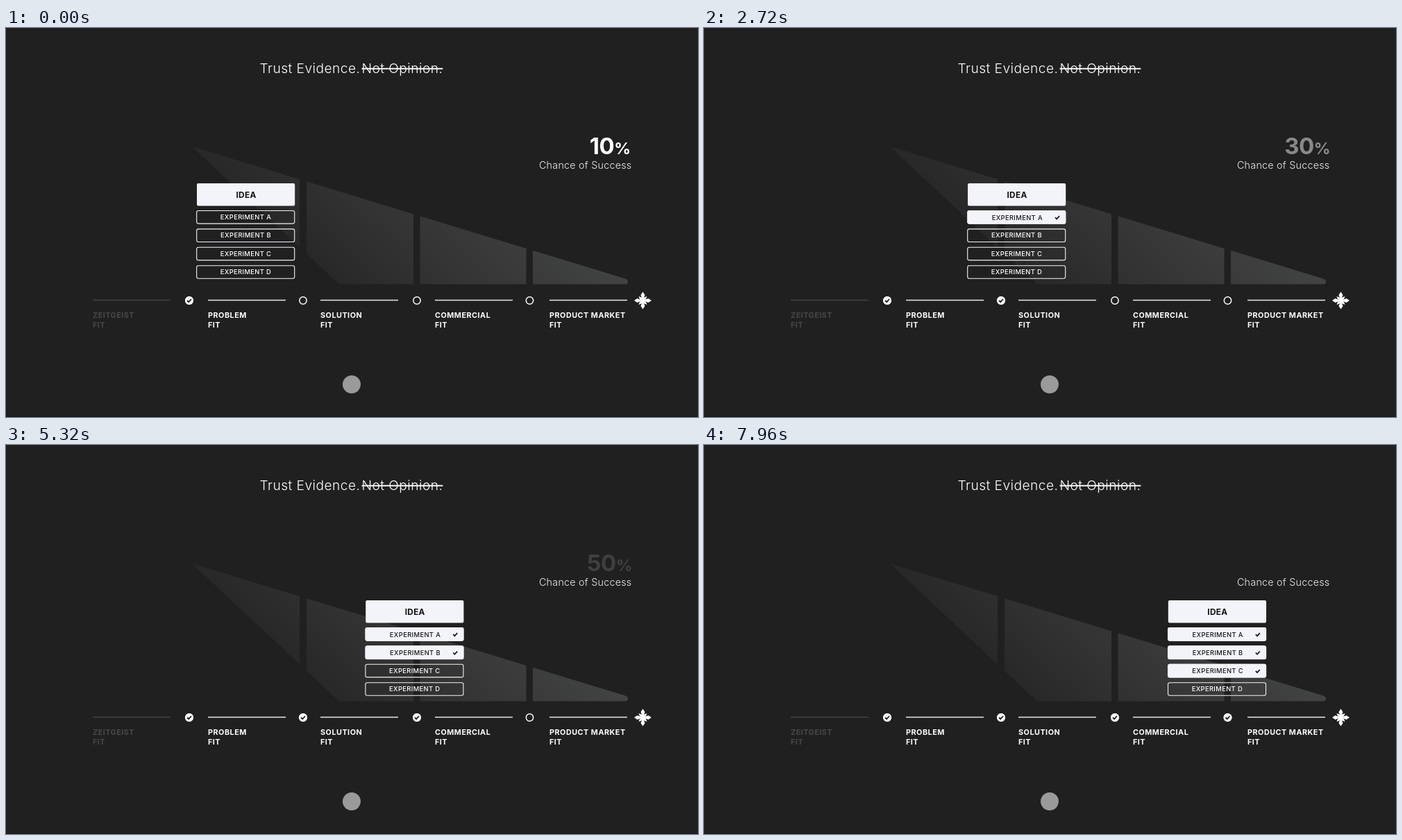
Animation, 997 px wide and 561 px high, one loop 8000 ms. Source, as an HTML page:

```html
<!DOCTYPE html>
<html lang="en">
<head>
<meta charset="utf-8">
<title>Trust Evidence</title>
<style>
  html, body { margin: 0; width: 100%; height: 100%; overflow: hidden; background: #202020; }
  svg { display: block; width: 997px; height: 561px; font-family: Inter, "Open Sans", sans-serif; fill: #fff; }
  .title { font-size: 19.2px; font-weight: 350; letter-spacing: .45px; }
  .strike { text-decoration: line-through; text-decoration-thickness: 1.3px; }
  .chance { font-size: 14.4px; font-weight: 300; letter-spacing: .2px; text-anchor: end; fill: #eee; }
  .percent { font-size: 33px; font-weight: 700; text-anchor: end; letter-spacing: -.6px; }
  .percent tspan { font-size: 23.5px; font-weight: 650; letter-spacing: 0; }
  .label { font-size: 10.8px; font-weight: 700; letter-spacing: .5px; }
  .idea { font-size: 11.8px; font-weight: 700; text-anchor: middle; letter-spacing: .3px; fill: #111; }
  .item { font-size: 9.4px; font-weight: 450; text-anchor: middle; letter-spacing: .35px; }
  .dark { fill: #161616; }
  .tick { fill: none; stroke: #1c1c1c; stroke-width: 1.8; }
</style>
</head>
<body>
<svg viewBox="0 0 997 561">
  <defs>
    <linearGradient id="shade" gradientUnits="userSpaceOnUse" x1="270" y1="173" x2="475" y2="-46">
      <stop offset="0" stop-color="#202020"/>
      <stop offset="0" stop-color="#282828"/>
      <stop offset=".3" stop-color="#313131"/>
      <stop offset="1" stop-color="#434444"/>
    </linearGradient>
  </defs>
  <text class="title" x="365.5" y="65">Trust Evidence.</text>
  <text class="title strike" x="512.5" y="65">Not Opinion.</text>
  <path fill="url(#shade)" d="M268 175Q268 171 273 172.500L892 361.500Q896 363 896 366Q896 369.500 892 369.500H268Z"/>
  <path fill="#202020" d="M423 200h10v172h-10zM587 250h9.500v122h-9.500zM749.500 300h9.500v72h-9.500z"/>
  <g id="percents"></g>
  <text class="chance" x="901.5" y="203">Chance of Success</text>
  <g id="track"></g>
  <g id="star" transform="translate(917.5 393)"></g>
  <circle cx="498" cy="514" r="13" fill="#9a9a9a"/>
  <rect y="560" width="997" height="1" fill="#141414"/>
  <g id="card"></g>
</svg>
<script>
const LOOP = 8000, PERIOD = 2680;
const MOVE = 2167, FILL = 640;
const PULSES = [1560, 4040, 6720];
const NODES = [264, 428, 592, 754.5];
const STOPS = [[125, 'ZEITGEIST'], [291, 'PROBLEM'], [453, 'SOLUTION'], [618, 'COMMERCIAL'], [783, 'PRODUCT MARKET']];

const $ = id => document.getElementById(id);
const all = sel => [...document.querySelectorAll(sel)];
const progress = (t, start, length) => Math.min(1, Math.max(0, (t - start) / length));
const inOut = p => p < .5 ? 2 * p * p : 1 - 2 * (1 - p) ** 2;
const out = p => 1 - (1 - p) ** 3;
const tick = (x, y) => `<path class="tick" d="M${x - 3} ${y}l2.200 2.200l3.800 -4.200"/>`;

$('percents').innerHTML = [10, 30, 50].map((n, i) =>
  `<text class="percent" x="${i ? 902.5 : 900}" y="181.5">${n}<tspan>%</tspan></text>`).join('');

$('track').innerHTML = STOPS.map(([x, name], i) => `
  <g fill="${i ? '#fff' : '#484848'}">
    <rect x="${x}" y="391.8" width="112" height="1.5" fill="${i ? '#e8e8e8' : '#444'}"/>
    <text class="label" x="${x}" y="417.5">${name}</text>
    <text class="label" x="${x}" y="432">FIT</text>
  </g>`).join('') + NODES.map(x => `
  <circle class="pulse" cx="${x - 2}" cy="393" r="0" fill="none" stroke="#fff"/>
  <circle cx="${x}" cy="393" r="5.200" fill="#202020" stroke="#fff" stroke-width="1.500"/>
  <g class="done"><circle cx="${x}" cy="393" r="6"/>${tick(x, 393)}</g>`).join('');

// Kite-shaped arms on the axes, small points on the diagonals.
$('star').innerHTML = '<circle r="3.8"/>' + [0, 90, 180, 270].map(a => `
  <path transform="rotate(${a})" d="M0 0L-3 -8L0 -12.500L3 -8Z"/>
  <path transform="rotate(${a + 45})" d="M0 0L-1.800 -4.500L0 -8.500L1.800 -4.500Z"/>`).join('');

$('card').innerHTML = `
  <rect x="275" y="224" width="141.200" height="32.500" rx="2" fill="#f3f4f9"/>
  <text class="idea" x="346" y="244.5">IDEA</text>` + [...'ABCD'].map((letter, i) => {
  const y = 263.5 + i * 26.4, name = 'EXPERIMENT ' + letter;
  return `
  <rect x="274.700" y="${y}" width="141" height="18.600" rx="2.500" fill="none" stroke="#f3f4f9" stroke-width="1.100"/>
  <text class="item" x="345.5" y="${y + 12.4}">${name}</text>
  <g class="filled">
    <rect x="274.600" y="${y - .5}" width="141.700" height="19.800" rx="2.500" fill="#f3f4f9"/>
    <text class="item dark" x="346.3" y="${y + 13}">${name}</text>
    ${tick(404, y + 9.7)}
  </g>`;
}).join('');

const percents = all('.percent'), pulses = all('.pulse'), done = all('.done'), filled = all('.filled');

function draw(now) {
  const t = now % LOOP;
  let x = 0;
  for (let i = 0; i < 3; i++) x += 163.5 * inOut(progress(t, MOVE + i * PERIOD, 960));
  $('card').setAttribute('transform', `translate(${x})`);

  filled.forEach((g, i) => g.style.opacity = out(progress(t, FILL + i * PERIOD, 650)));

  percents.forEach((text, i) => {
    const shown = i ? progress(t, 2608 + (i - 1) * PERIOD, 240) : 1;
    const hidden = progress(t, 2190 + i * PERIOD, 300);
    text.style.opacity = shown * (1 - hidden);
  });

  NODES.forEach((_, i) => {
    const start = i ? PULSES[i - 1] : -LOOP;
    const p = progress(t, start, 720);
    done[i].style.opacity = progress(t, start, 200);
    pulses[i].setAttribute('r', 6 + 29 * out(p));
    pulses[i].style.opacity = p > 0 ? .5 * (1 - p) : 0;
  });
  requestAnimationFrame(draw);
}
requestAnimationFrame(draw);
</script>
</body>
</html>
```
